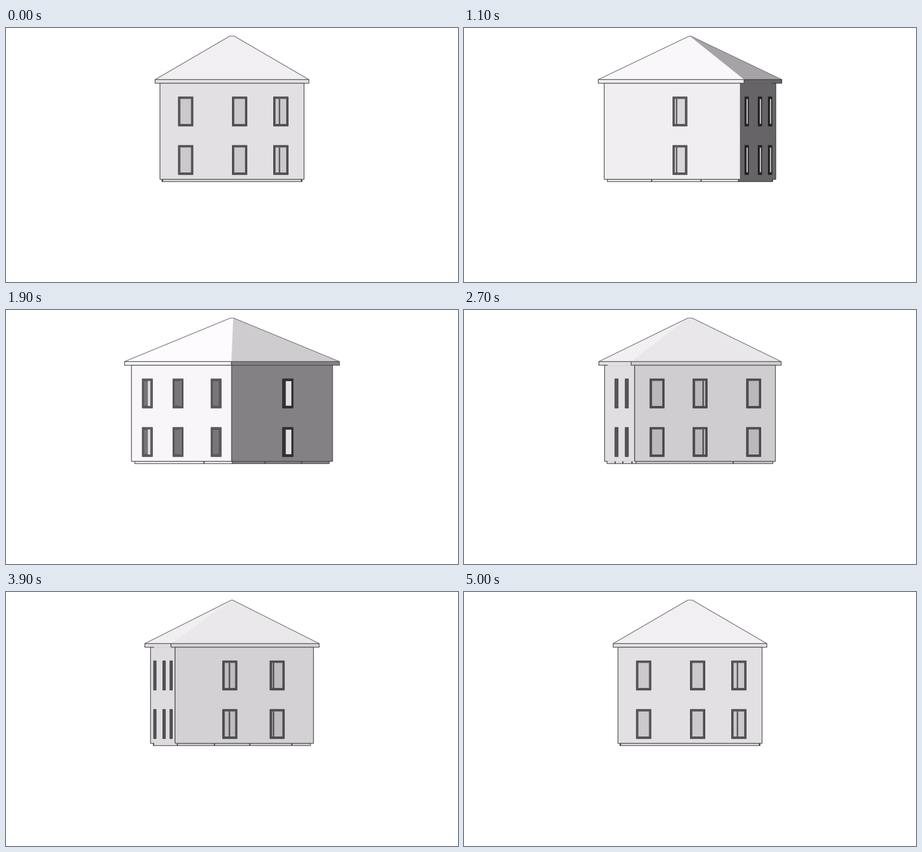
Animation, 800 px wide and 450 px high, one loop 5.1 s. Source, as an HTML page with a canvas:

```html
<!DOCTYPE html>
<html lang="en">
<head>
<meta charset="utf-8">
<title>Turning house</title>
<style>
  html, body { margin: 0; width: 100%; height: 100%; overflow: hidden; background: #fff; }
  canvas { display: block; }
</style>
</head>
<body>
<canvas id="stage" width="800" height="450"></canvas>
<script>
const ctx = document.getElementById('stage').getContext('2d');
const CX = 400, STEP = 100, STEPS = 51;
const APEX = 14.4, EAVE_TOP = 91.4, EAVE = 97.8, GROUND = 268.1, FOOT = 272.1;
const ROOM_DEPTH = 40, CASING = 1.8;

// Half extents [x, z] of each horizontal layer
const WALL = [127.5, 124.3], ROOF = [136, 133], BASE = [124, 119.5], RIDGE = [4, 0.5];

// Brightness by the angle between a face's normal and the viewer
const WALL_TONES = [[-90, 213], [-78, 224], [-47, 248], [-14, 240], [0, 226], [12, 208], [44, 131], [76, 102], [90, 98]];
const ROOF_TONES = [[-90, 238], [-78, 242], [-47, 253], [-14, 249], [0, 241], [12, 233], [44, 206], [76, 165], [90, 150]];

// Windows: u = centre, left/right = room walls beside it, bar = mullion offset
const FACES = [
  { windows: [{ u: -82 }, { u: 13.5 }, { u: 86.5, bar: -2.5 }], ticks: [-123, 123] },
  { windows: [{ u: 14, right: 20, bar: -6.2 }], ticks: [-38.5, 51.5] },
  { windows: [{ u: -87, left: -40, right: 50 }, { u: -9, left: -37, right: 50, bar: 5.5 }, { u: 88, left: -25, right: 20 }], ticks: [52] },
  { windows: [{ u: -26, bar: -0.7 }, { u: 59, bar: -6.5 }], ticks: [-53, 10.5, 86] }
];

const gray = v => `rgb(${v},${v - 2},${v + 1})`;
const clamp = (v, lo, hi) => Math.max(lo, Math.min(hi, v));

function tone(table, angle) {
  const i = clamp(table.findIndex(p => p[0] >= angle), 1, table.length - 1);
  const [a, va] = table[i - 1], [b, vb] = table[i];
  return va + (vb - va) * clamp((angle - a) / (b - a), 0, 1);
}

function box(x0, y0, x1, y1, fill, line, width = 1.3) {
  ctx.fillStyle = fill;
  ctx.fillRect(x0, y0, x1 - x0, y1 - y0);
  if (!line) return;
  ctx.strokeStyle = line;
  ctx.lineWidth = width;
  ctx.strokeRect(x0, y0, x1 - x0, y1 - y0);
}

function path(points) {
  ctx.beginPath();
  points.forEach(p => ctx.lineTo(...p));
}

function drawWindow(face, win, y) {
  const { cos, sin, angle, shade } = face;
  const { left = -30, right = 30, bar } = win;
  const mid = face.x(WALL, win.u);
  const outer = 12.9 * cos, inner = 9.4 * cos;
  const frame = gray(shade * 0.385), line = gray(shade * 0.3);
  box(mid - outer, y, mid + outer, y + 51.6, frame, line, 1.2);
  if (angle < -65) return;

  // The raised casing hides a sliver of glass on one side
  const lo = -inner + Math.max(0, CASING * sin), hi = inner + Math.min(0, CASING * sin);
  const top = y + 3.6, bottom = y + 48;
  const side = gray(0.92 * tone(WALL_TONES, angle - 90 * Math.sign(angle)));
  const cornerL = clamp(left * cos - ROOM_DEPTH * sin, lo, hi);
  const cornerR = clamp(right * cos - ROOM_DEPTH * sin, lo, hi);
  box(mid + lo, top, mid + hi, bottom, side, line, 0.8);
  box(mid + cornerL, top, mid + cornerR, bottom, gray(shade * 0.9));
  if (bar !== undefined && Math.abs(angle) < 65) {
    box(mid + (bar - 1.3) * cos, top, mid + (bar + 1.3) * cos, bottom, frame);
  }
}

function drawFace(face) {
  const { x, cos, shade, windows, ticks } = face;
  const fill = gray(shade), line = gray(Math.min(82, shade * 0.6));
  const span = size => [x(size, -1, true), x(size, 1, true)];
  const [b0, b1] = span(BASE), [w0, w1] = span(WALL), [e0, e1] = span(ROOF);
  box(b0, GROUND, b1, FOOT, fill, line);
  box(e0, EAVE_TOP, e1, EAVE, fill, line);
  box(w0, EAVE, w1, GROUND, fill, line);
  // Ledges vanish on a face seen nearly edge-on
  if (cos < 0.35 && b1 - b0 > 3) {
    for (const y of [EAVE, GROUND]) box(b0 + 1, y - 1, b1 - 1, y + 1, fill);
  }
  for (const u of ticks) box(x(BASE, u) - 1, GROUND, x(BASE, u) + 1, FOOT, gray(70));
  for (const win of windows) for (const y of [122, 208]) drawWindow(face, win, y);
}

function drawRoof(faces) {
  for (const { x, angle } of faces) {
    path([[x(ROOF, -1, true), EAVE_TOP], [x(RIDGE, -1, true), APEX],
          [x(RIDGE, 1, true), APEX], [x(ROOF, 1, true), EAVE_TOP]]);
    ctx.fillStyle = ctx.strokeStyle = gray(tone(ROOF_TONES, angle));
    ctx.lineWidth = 0.5;
    ctx.fill();
    ctx.stroke();
  }
  const edge = size => Math.max(...faces.flatMap(f => [-1, 1].map(s => Math.abs(f.x(size, s, true) - CX))));
  const eave = edge(ROOF), ridge = edge(RIDGE);
  path([[CX - eave, EAVE_TOP], [CX - ridge, APEX], [CX + ridge, APEX], [CX + eave, EAVE_TOP]]);
  ctx.strokeStyle = gray(132);
  ctx.lineWidth = 1.4;
  ctx.stroke();
}

function orient(face, i, turn) {
  const a = (turn - 90 * i) * Math.PI / 180;
  const cos = Math.cos(a), sin = Math.sin(a), angle = Math.atan2(sin, cos) * 180 / Math.PI;
  // Screen x of a point on this face; u is a fraction of the half width if relative
  const x = (size, u, relative) =>
    CX + u * (relative ? size[i % 2] : 1) * cos + size[1 - i % 2] * sin;
  return { ...face, cos, sin, angle, x, shade: tone(WALL_TONES, angle) };
}

function draw(now) {
  const step = Math.floor(now / STEP) % STEPS;
  const turn = Math.max(0, step - 0.6) * 360 / 49.4;
  const faces = FACES.map((f, i) => orient(f, i, turn))
    .filter(f => f.cos > 0.01)
    .sort((a, b) => a.cos - b.cos);
  ctx.fillStyle = '#fff';
  ctx.fillRect(0, 0, 800, 450);
  ctx.lineJoin = 'round';
  drawRoof(faces);
  faces.forEach(drawFace);
}

const start = performance.now();
(function tick() {
  draw(performance.now() - start);
  requestAnimationFrame(tick);
})();
</script>
</body>
</html>
```
